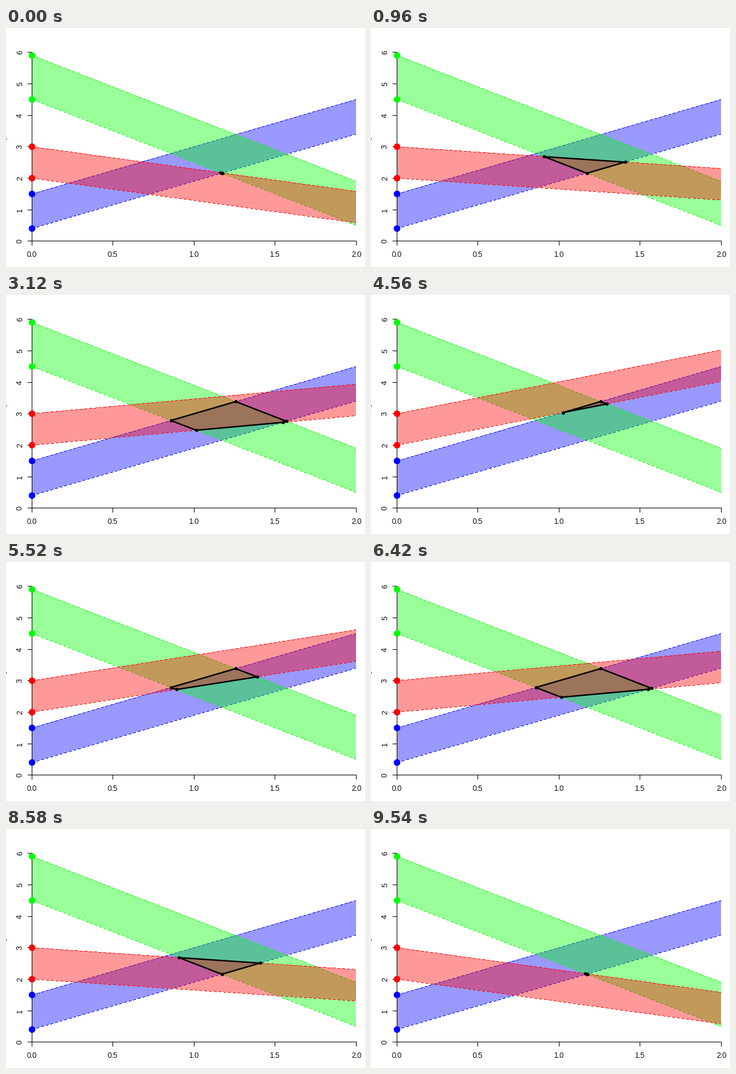
A matplotlib script that plays this animation: 600 px wide and 400 px high, repeating every 9600 ms.

```python
import itertools

import matplotlib.pyplot as plt
import numpy as np
from matplotlib.animation import FuncAnimation
from matplotlib.patches import Circle, Polygon, Rectangle

W, H = 600, 400
HALF = 80                      # frames in one sweep, then it runs back
SLOPE_MIN, SLOPE_MAX = -0.71, 1.08
LEFT, RIGHT = 43, 585          # pixel columns of the plot area
DASH_ON, DASH_PERIOD = 5, 8

plt.rcParams["font.family"] = "Liberation Sans"
plt.rcParams["text.hinting"] = "native"
plt.rcParams["text.hinting_factor"] = 1
plt.rcParams["toolbar"] = "None"

fig = plt.figure(figsize=(W / 72, H / 72), dpi=72, facecolor="white")
ax = fig.add_axes([0, 0, 1, 1])
ax.set_xlim(0, W)
ax.set_ylim(H, 0)
ax.axis("off")


def px(x, y):
    """Data values to stage pixels."""
    return 43.5 + 270.8 * np.asarray(x), 356.7 - 52.67 * np.asarray(y)


COLS = np.arange(LEFT, RIGHT)
COL_X = (COLS + 0.5 - 43.5) / 270.8     # data value at each column's centre


class Strip:
    """Band between two parallel lines, with crisp dashed edges."""

    def __init__(self, low, high, slope, color, z):
        self.low, self.high = low, high
        self.fill = ax.add_patch(Polygon(
            np.zeros((4, 2)), fc=color, ec="none", alpha=0.4, lw=0,
            snap=False, zorder=z))
        self.edges = [ax.plot([], [], color=color, lw=1, snap=False,
                              solid_capstyle="butt", zorder=z + 0.1)[0]
                      for _ in range(2)]
        for value in (low, high):
            ax.add_patch(Circle(px(0, value), 5.5, fc=color, ec="none",
                                lw=0, zorder=6))
        self.set_slope(slope)

    def set_slope(self, slope):
        self.slope = slope
        bottom, top = [np.floor(px(0, start + slope * COL_X)[1])
                       for start in (self.low, self.high)]
        x = np.column_stack([COLS, COLS + 1]).ravel()
        self.fill.set_xy(np.column_stack([
            np.r_[x, x[::-1]],
            np.r_[np.repeat(top, 2), np.repeat(bottom, 2)[::-1]]]))

        stretch = np.hypot(1, slope * 52.67 / 270.8)
        on = (COLS - LEFT) * stretch % DASH_PERIOD < DASH_ON
        gap = np.full(on.sum(), np.nan)
        for edge, rows in zip(self.edges, (bottom, top)):
            y = rows[on] + 0.5
            edge.set_data(np.column_stack([COLS[on], COLS[on] + 1, gap]).ravel(),
                          np.column_stack([y, y, gap]).ravel())

    def contains(self, x, y):
        start = y - self.slope * x
        return self.low - 1e-9 <= start <= self.high + 1e-9


def common_corners(strips):
    """Corners of the area shared by all strips, in order around it."""
    corners = []
    for a, b in itertools.combinations(strips, 2):
        if abs(a.slope - b.slope) < 1e-9:
            continue
        for p, q in itertools.product((a.low, a.high), (b.low, b.high)):
            x = (q - p) / (a.slope - b.slope)
            y = p + a.slope * x
            if all(s.contains(x, y) for s in strips):
                corners.append((x, y))
    pts = np.array(corners)
    dx, dy = (pts - pts.mean(axis=0)).T
    return pts[np.argsort(np.arctan2(dy, dx))]


def draw_axes():
    style = dict(color="black", lw=1, snap=False,
                 solid_capstyle="projecting", zorder=5)
    text = dict(fontsize=12, ha="center", va="baseline", zorder=5)
    x0, y0 = [np.floor(p) + 0.5 for p in px(0, 0)]
    x1, y1 = [np.floor(p) + 0.5 for p in px(2, 6)]
    ax.plot([x0, x0], [y0, y1], **style)
    ax.plot([x0, x1], [y0, y0], **style)
    for v in np.arange(0, 2.1, 0.5):
        x = np.floor(px(v, 0)[0]) + 0.5
        ax.plot([x, x], [y0, y0 + 7], **style)
        ax.text(x, 383, f"{v:.1f}", **text)
    for v in range(7):
        y = np.floor(px(0, v)[1]) + 0.5
        ax.plot([x0 - 7, x0], [y, y], **style)
        ax.text(27, y, str(v), rotation=90, rotation_mode="anchor", **text)
    # sliver of the axis title cut off by the left border
    ax.add_patch(Rectangle((0, 184), 1, 3, fc="#a03050", ec="none", lw=0))


blue = Strip(0.4, 1.5, 1.5, "#0000ff", 1)
green = Strip(4.5, 5.9, -2, "#00ff00", 2)
red = Strip(2, 3, SLOPE_MIN, "#ff0000", 3)
draw_axes()

outline = ax.plot([], [], color="black", lw=2.4, solid_joinstyle="round",
                  marker="o", ms=5.5, mew=0, zorder=7)[0]


def update(i):
    step = min(i, 2 * HALF - 1 - i)
    red.set_slope(SLOPE_MIN + (SLOPE_MAX - SLOPE_MIN) * step / (HALF - 1))
    pts = common_corners([blue, green, red])
    outline.set_data(*px(*np.vstack([pts, pts[:1]]).T))
    return [red.fill, *red.edges, outline]


anim = FuncAnimation(fig, update, frames=2 * HALF, interval=60, repeat=True,
                     repeat_delay=0, blit=False)
plt.show()
```
